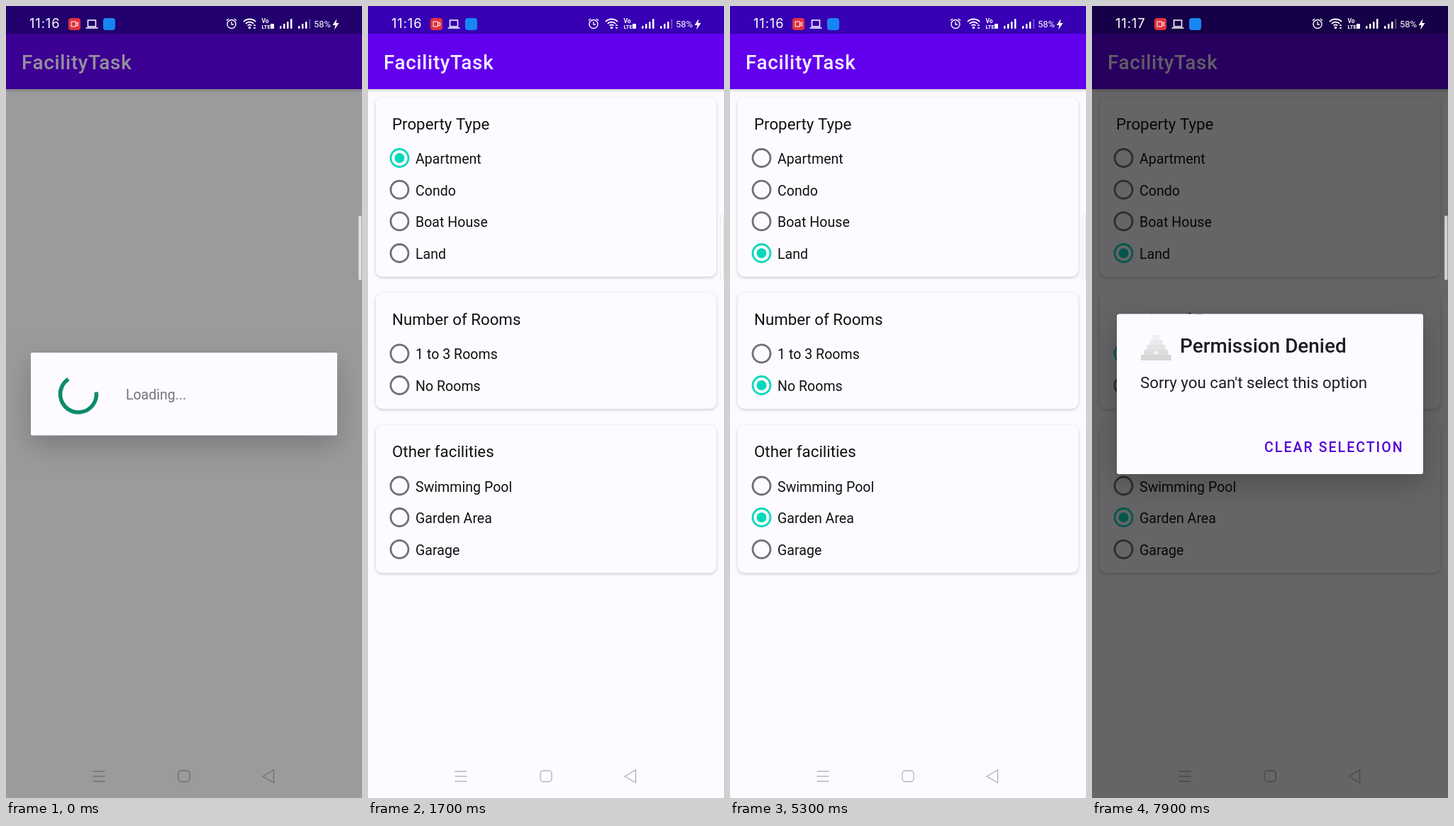
Animation of 502x1115 px, one loop 8000 ms. Source, as an HTML page with a canvas:

```html
<!DOCTYPE html>
<html lang="en">
<head>
<meta charset="utf-8">
<title>Facility form</title>
<style>
  html, body { margin: 0; width: 100%; height: 100%; overflow: hidden; background: #fdfbff; }
  canvas { display: block; }
</style>
</head>
<body>
<canvas id="stage" width="502" height="1115"></canvas>
<script>
const ctx = document.getElementById('stage').getContext('2d');
const LOOP = 8000, NEVER = 2 * LOOP, W = 502, H = 1115;
const PAPER = '#fdfbff', GREY = [112, 111, 116], TEAL = [6, 216, 187];

const clamp = v => Math.max(0, Math.min(1, v));
const ramp = (t, from, to) => clamp((t - from) / (to - from));
const mix = (a, b, p) => `rgb(${a.map((v, i) => Math.round(v + (b[i] - v) * p))})`;

// Each option: label, centre y, time it is switched on, time it is switched off.
const cards = [
  { title: 'Property Type', top: 129, bottom: 381, titleY: 174, options: [
    ['Apartment', 214, 1480, 4540], ['Condo', 258.6], ['Boat House', 303.2], ['Land', 348, 4540]] },
  { title: 'Number of Rooms', top: 404, bottom: 567, titleY: 449, options: [
    ['1 to 3 Rooms', 489.3, 6760], ['No Rooms', 534, 2060, 6760]] },
  { title: 'Other facilities', top: 590, bottom: 798, titleY: 635, options: [
    ['Swimming Pool', 675.5], ['Garden Area', 720, 3040], ['Garage', 764.8]] }
];
const taps = [
  { y: 214, down: 1400, up: 1480 }, { y: 534, down: 1900, up: 2060 },
  { y: 720, down: 2900, up: 3040 }, { y: 348, down: 4400, up: 4540 },
  { y: 489.3, down: 6500, up: 6760 }
];

function rect(x, y, w, h, color, radius = 0) {
  ctx.fillStyle = color;
  ctx.beginPath();
  ctx.roundRect(x, y, w, h, radius);
  ctx.fill();
}

function text(str, x, y, size, color, { weight = 400, spacing = 0, family = 'Roboto' } = {}) {
  ctx.font = `${weight} ${size}px ${family}, sans-serif`;
  ctx.letterSpacing = spacing + 'px';
  ctx.fillStyle = color;
  ctx.fillText(str, x, y);
}

function circle(x, y, r, color, line = 0, from = 0, to = 2 * Math.PI) {
  ctx.beginPath();
  ctx.arc(x, y, r, from, to);
  if (line) {
    ctx.strokeStyle = color;
    ctx.lineWidth = line;
    ctx.stroke();
  } else {
    ctx.fillStyle = color;
    ctx.fill();
  }
}

function path(d, color, line = 0) {
  const shape = new Path2D(d);
  if (line) {
    ctx.strokeStyle = color;
    ctx.lineWidth = line;
    ctx.stroke(shape);
  } else {
    ctx.fillStyle = color;
    ctx.fill(shape);
  }
}

function raised(x, y, w, h, radius, alpha, blur, drop) {
  ctx.save();
  ctx.shadowColor = `rgba(0,0,0,${alpha})`;
  ctx.shadowBlur = blur;
  ctx.shadowOffsetY = drop;
  rect(x, y, w, h, PAPER, radius);
  ctx.restore();
}

function radio([label, y, on = NEVER, off = NEVER], t) {
  const x = 44.5;
  const level = (delay, span) =>
    ramp(t, on + delay, on + delay + span) - ramp(t, off + delay, off + delay + span);
  const color = mix(GREY, TEAL, level(0, 60));
  circle(x, y, 12.5, color, 2.8);
  const dot = 7 * level(50, 120);
  if (dot > 0) circle(x, y, dot, color);
  text(label, 67, Math.round(y + 8), 19.5, '#111', { spacing: 0.05 });
}

function ripple({ y, down, up }, t) {
  const alpha = 0.15 * ramp(t, down, down + 80) * (1 - ramp(t, up + 50, up + 210));
  if (alpha > 0) circle(44.5, y, 14 + 13 * ramp(t, down, down + 180), `rgba(0,0,0,${alpha})`);
}

function navBar() {
  const color = '#b7b5b9';
  path('M122.500 1077.500h17M122.500 1084.500h17M122.500 1091.500h17', color, 1.4);
  ctx.beginPath();
  ctx.roundRect(243, 1076.5, 16, 15.5, 4);
  ctx.stroke();
  path('M362 1084.500L377.500 1075.500V1093.500Z', color, 1.4);
}

function form(t) {
  for (const { title, top, bottom, titleY, options } of cards) {
    raised(11, top, 480, bottom - top, 9, 0.2, 4, 1.5);
    text(title, 34, titleY, 22.3, '#111');
    options.forEach(option => radio(option, t));
  }
  taps.forEach(tap => ripple(tap, t));
}

function appBar() {
  rect(0, 0, W, 39, '#3700b3');
  rect(0, 39, W, 78, '#6200ee');
  const shade = ctx.createLinearGradient(0, 117, 0, 122);
  shade.addColorStop(0, 'rgba(0,0,0,.16)');
  shade.addColorStop(1, 'rgba(0,0,0,0)');
  rect(0, 117, W, 5, shade);
  text('FacilityTask', 22, 89, 27.9, '#f4edff', { weight: 500, spacing: 0.65 });
}

function statusIcons(t) {
  const white = '#fff';
  text(t < 7800 ? '11:16' : '11:17', 33, 31, 18.3, white, { family: 'Inter', spacing: 0.9 });

  rect(88, 17, 17, 17, '#e2313e', 4);
  path('M92 22h6.500v7H92ZM98.500 24.500l3-1.500v5l-3-1.500', white, 1);
  path('M115.500 20h11v9h-11ZM112.500 31h17', white, 1.5);
  rect(137, 17, 17, 17, '#1686f2', 4);

  circle(318, 25.5, 6, white, 1.4);
  path('M318 22v4h3M311 20.500l3-2.500M325 20.500l-3-2.500', white, 1.3);

  [4, 8, 12].forEach(r => circle(343.5, 30.5, r, white, 1.8, -2.36, -0.78));
  circle(343.5, 30.5, 1.8, white);
  path('M348.500 28l2-2.500 2 2.500ZM348.500 30l2 2.500 2-2.500Z', white);

  text('Vo', 360.5, 24, 8.5, white, { weight: 700 });
  text('LTE', 360.5, 32, 7.5, white, { weight: 700 });
  rect(373, 25, 5, 7, white, 1);

  [4, 7, 10, 14].forEach((h, i) => {
    rect(386 + i * 5, 32 - h, 2.5, h, white, 1);
    rect(412 + i * 5, 32 - h, 2.5, h, i < 3 ? white : 'rgba(255,255,255,.25)', 1);
  });

  text('58%', 434, 29.5, 13, white);
  path('M466.500 18L460.500 27H464.500L463 33.500L469.500 24H465.500Z', white);
}

function dim(alpha) {
  if (alpha > 0) rect(0, 0, W, H, `rgba(0,0,0,${alpha})`);
}

function loadingDialog(t) {
  ctx.globalAlpha = 1 - ramp(t, 200, 340);
  raised(35, 488, 432, 116.5, 2, 0.22, 40, 15);
  const start = -0.12 + t * 0.005;
  circle(102, 546.5, 25.5, '#0c8a6d', 5.5, start, start + 4.24 + t * 0.001);
  text('Loading...', 169, 554, 19.5, '#757378');
  ctx.globalAlpha = 1;
}

function deniedDialog(progress) {
  ctx.globalAlpha = clamp(progress * 1.23);
  raised(35, 433.5, 432, 225.5, 3, 0.24, 38, 12);
  // Warning icon: a stepped, pale triangle.
  ['#f0eff1', '#eae9eb', '#e4e3e5', '#deddde', '#dad9da'].forEach((color, i) => {
    const half = 5 + i * 4;
    rect(90.5 - half, 463 + i * 7, half * 2, 7.5, color);
  });
  rect(69, 492, 43, 7, '#d6d5d7', 2);
  circle(90.5, 488, 2.5, '#f6f5f7');
  text('Permission Denied', 124, 488, 27.9, '#1f1d21', { weight: 500 });
  text("Sorry you can't select this option", 68, 538, 22.3, '#1f1d21');
  text('CLEAR SELECTION', 243, 628, 19.5, '#5200d8', { weight: 500, spacing: 2.05 });
  ctx.globalAlpha = 1;
}

function edgeHandle() {
  rect(497, 295, 4.5, 91, 'rgba(255,255,255,.7)', 2);
  ctx.strokeStyle = 'rgba(120,120,125,.2)';
  ctx.lineWidth = 1;
  ctx.stroke();
}

function draw(t) {
  const denied = ramp(t, 6850, 7040);
  rect(0, 0, W, H, PAPER);
  if (t < 200 || t >= 500) navBar();
  if (t >= 500) form(t);
  appBar();
  dim(0.39 * (1 - ramp(t, 200, 380)) + 0.6 * denied);
  if (t < 340) loadingDialog(t);
  if (denied > 0) deniedDialog(denied);
  edgeHandle();
  statusIcons(t);
}

const begin = performance.now();
function tick() {
  draw((performance.now() - begin) % LOOP);
  requestAnimationFrame(tick);
}
tick();
</script>
</body>
</html>
```
